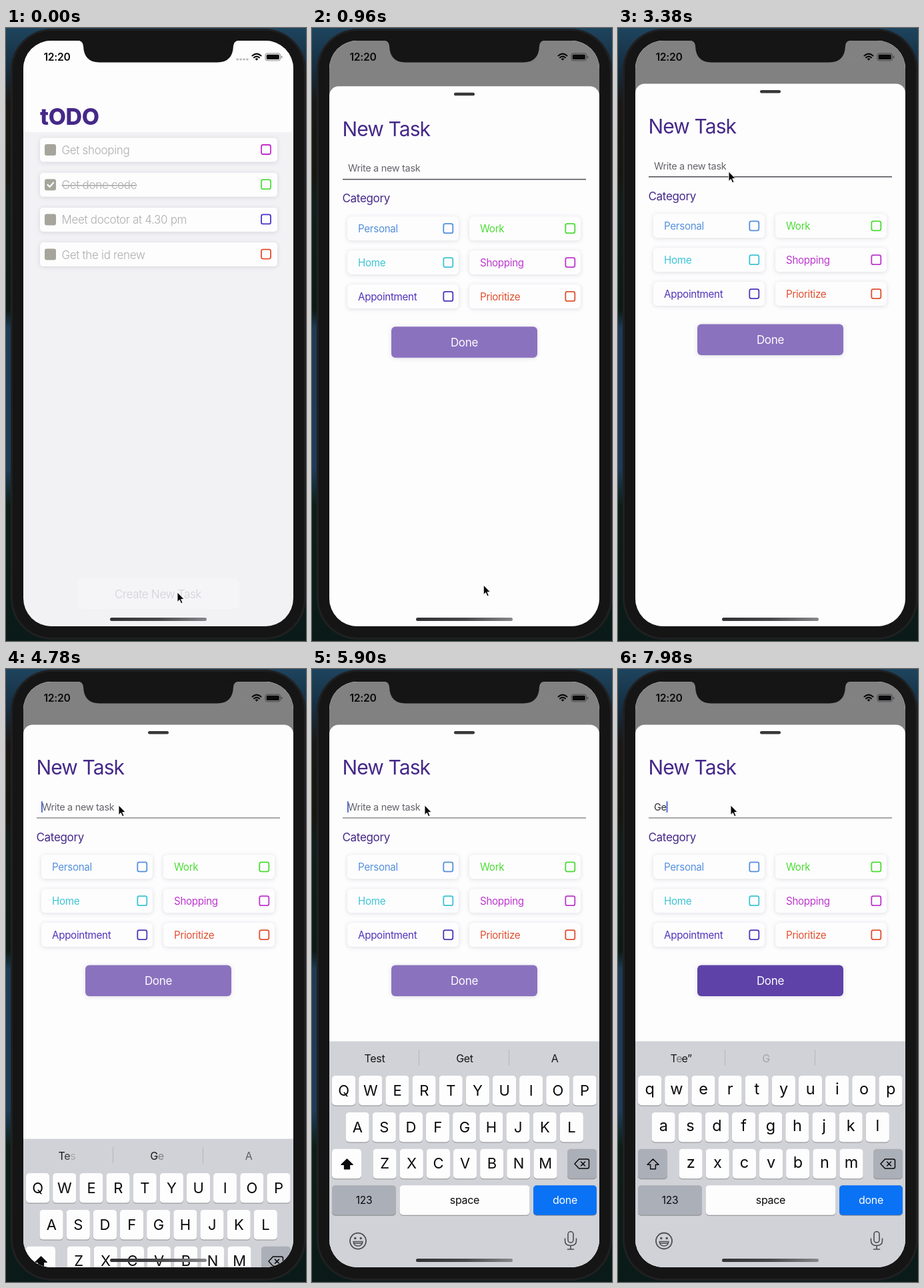
These frames come from a looping animation (450x918 px, 8000 ms). An HTML page:

```html
<!DOCTYPE html>
<html lang="en">
<head>
<meta charset="utf-8">
<title>tODO</title>
<style>
  html, body { margin: 0; width: 100%; height: 100%; overflow: hidden; background: #161616; }
  svg { display: block; width: 450px; height: 918px; font-family: Inter, Roboto, sans-serif; letter-spacing: -.02em; }
  .mid { text-anchor: middle; }
  .card { filter: drop-shadow(0 1px 3px rgba(30, 30, 60, .14)); }
  .key { filter: drop-shadow(0 1px 0 #898a8d); }
  .line { fill: none; stroke-linecap: round; stroke-linejoin: round; }
</style>
</head>
<body>
<svg id="stage" viewBox="0 0 450 918"></svg>
<script>
const LOOP = 8000;
const SHEET = { start: 100, from: 896, to: 83.5 };
const KEYBOARD = { start: 4562, travel: 338 };
const FOCUS = 4500;
const TYPED = [[7640, 'G'], [7900, 'Ge']];
const POINTER = [
  [0, 257, 845], [900, 257, 845], [1520, 268, 447], [1900, 240, 330],
  [2500, 190, 250], [3200, 166, 215], [3400, 166, 215], [3800, 169, 204], [LOOP, 169, 204]
];
const WHITE = '#fdfdfe', INK = '#0a0a0c', KEY_GRAY = '#abafb7', TITLE = '#452888';
const PLACEHOLDER = '#64646a', LINE = '#56565c', IDLE = '#8b72bf', READY = '#5e42a8';

const rect = (x, y, w, h, r, fill, more = '') =>
  `<rect x="${x}" y="${y}" width="${w}" height="${h}" rx="${r}" fill="${fill}" ${more}/>`;
const text = (x, y, size, fill, body, more = '') =>
  `<text x="${x}" y="${y}" font-size="${size}" fill="${fill}" ${more}>${body}</text>`;
const line = (d, stroke, width, more = '') =>
  `<path class="line" d="${d}" stroke="${stroke}" stroke-width="${width}" ${more}/>`;
const checkbox = (cx, cy, color) =>
  rect(cx - 7, cy - 7, 14, 14, 2.5, 'none', `stroke="${color}" stroke-width="1.8"`);
const gradient = (id, axis, stops) => `<linearGradient id="${id}" ${axis}>` +
  stops.map(([at, c]) => `<stop offset="${at}" stop-color="${c}"/>`).join('') + '</linearGradient>';
const mid = 'class="mid"';

// Desktop slivers around the phone and the phone body
function device() {
  const desk = [[0, '#1e445e'], [.07, '#152c3e'], [.12, '#1a1816'], [.24, '#16160f'], [.28, '#0f1e1a'],
    [.46, '#0b1a14'], [.49, '#1c3c56'], [.72, '#1c3c58'], [.78, '#0c1e16'], [1, '#0a1a18']];
  return `<defs>${gradient('desk', 'x2="0" y2="1"', desk)}
    ${gradient('homeBar', '', [[0, '#323234'], [.5, '#48484a'], [1, '#88888c']])}
    <clipPath id="screen">${rect(26, 19, 405, 877, 42, '#fff')}</clipPath></defs>
    ${rect(0, 0, 450, 918, 0, 'url(#desk)')}
    ${rect(7, 1, 443, 915, 62, '#202022')}
    ${rect(10, 4, 437, 909, 59, '#151515')}`;
}

function taskList() {
  const tasks = [['Get shooping', '#c030cc'], ['Get done code', '#50de3c'],
    ['Meet docotor at 4.30 pm', '#4834cc'], ['Get the id renew', '#e84c30']];
  const rows = tasks.map(([label, color], i) => {
    const y = 182.5 + i * 52.2, done = i === 1;
    return rect(51, y - 18, 356, 36, 5, WHITE, 'class="card"') +
      rect(58, y - 8.5, 17, 17, 3, '#a5a59c') +
      (done ? line(`M62.5 ${y}l3 3.3 5.5-6.3`, WHITE, 2.2) : '') +
      text(83.5, y + 6.5, 17, '#aeaeae', label,
        `font-weight="300" ${done ? 'text-decoration="line-through"' : ''}`) +
      checkbox(390, y - .5, color);
  }).join('');
  return rect(26, 19, 405, 877, 0, '#f2f2f5') + rect(26, 19, 405, 137, 0, WHITE) +
    text(51, 145, 34, TITLE, 'tODO', 'font-weight="800" style="letter-spacing:-.01em"') + rows +
    rect(107, 824, 243, 46, 8, '#f5f5f8') +
    text(228, 853.5, 17, '#d2d2d6', 'Create New Task', mid + ' font-weight="300"');
}

function statusBar() {
  const dots = [0, 1, 2, 3].map(i => rect(345.5 + i * 4.9, 45.5, 3.4, 3, 1, '#848488', 'opacity=".55"')).join('');
  return text(56.5, 49, 15.7, INK, '12:20', 'font-weight="600"') + dots +
    line('M369.5 41.5q6.5-5.6 13 0M372 44.3q4-3.3 8 0', INK, 2.1) +
    `<path d="M373.6 46.2q2.4-1.8 4.8 0L376 48.8Z" fill="${INK}"/>` +
    rect(389, 38, 22.5, 10.8, 3, 'none', `stroke="${INK}" stroke-opacity=".5"`) +
    rect(390.7, 39.7, 19.1, 7.4, 1.6, INK) +
    rect(412.8, 41.7, 1.5, 3.6, .7, INK, 'opacity=".5"');
}

// Laid out at its resting position
function sheet() {
  const categories = [['Personal', '#5590dc'], ['Work', '#4cdc34'], ['Home', '#3cc4d4'],
    ['Shopping', '#bc38cc'], ['Appointment', '#5034b8'], ['Prioritize', '#e05030']];
  const cells = categories.map(([label, color], i) => {
    const x = 53 + (i % 2) * 183, y = 296.3 + (i >> 1) * 50.9;
    return rect(x, y - 18, 167, 36, 6, WHITE, 'class="card"') +
      text(x + 16, y + 5.6, 15.2, color, label) + checkbox(x + 151.3, y, color);
  }).join('');
  return rect(26, 83.5, 405, 900, 14, WHITE) + rect(213, 93, 31, 4.5, 2.2, '#38383a') +
    text(45.5, 158, 30, TITLE, 'New Task', 'style="letter-spacing:-.03em"') +
    text(54, 211.5, 14.5, PLACEHOLDER, 'Write a new task', 'id="entry"') +
    rect(46, 222, 365, 1.6, 0, LINE, 'id="underline"') +
    rect(53, 198, 1.8, 17, .8, '#4460d8', 'id="caret"') +
    text(45.5, 257.5, 17, TITLE, 'Category') + cells +
    rect(119, 443.5, 219, 46.5, 6, IDLE, 'id="done" class="card"') +
    text(228.5, 473, 17, WHITE, 'Done', mid);
}

const words = ['Test', 'Get', 'A'];
function keyboard() {
  const key = (x, y, w, fill, id = '') => rect(x, y, w, 44.5, 5, fill, `class="key" ${id}`);
  const letters = [['QWERTYUIOP', 30, 609], ['ASDFGHJKL', 50.5, 664], ['ZXCVBNM', 91.5, 718.7]]
    .map(([row, x0, y]) => [...row].map((c, i) => {
      const x = x0 + i * 40.15;
      return key(x, y, 35.2, WHITE) + text(x + 17.6, y + 29.5, 22, INK, c, 'class="mid letter"');
    }).join('')).join('');
  const suggestions = words.map((word, i) => text(94 + i * 135, 588.5, 16, '#161618',
    [...word].map(c => `<tspan class="hint${i}">${c}</tspan>`).join(''), mid)).join('');
  const face = '#4c4d52';
  return rect(26, 557.5, 405, 340, 0, '#d0d2d7') +
    rect(160, 570, 1, 24, 0, '#b5b7bc') + rect(295, 570, 1, 24, 0, '#b5b7bc') +
    suggestions + text(95.5, 588.5, 16, '#161618', 'e”', 'id="nextHint"') + letters +
    key(30, 718.7, 44, WHITE, 'id="shift"') +
    line('M52.5 734l8.5 8.2h-4.6v6.6h-7.8v-6.6H44Z', INK, 1.5, 'id="arrow"') +
    key(383, 718.7, 44, KEY_GRAY) +
    line('M400.5 734h12.5q2.5 0 2.5 2.5v9q0 2.5-2.5 2.5h-12.5l-6.5-7ZM403.5 738l6 6M409.5 738l-6 6', INK, 1.5) +
    key(30, 773.2, 96, KEY_GRAY) + text(78, 801, 15.5, INK, '123', mid) +
    key(131.5, 773.2, 195, WHITE) + text(229, 800.5, 16, INK, 'space', mid) +
    key(332, 773.2, 95, '#0a72f4') + text(379.5, 800.5, 16, WHITE, 'done', mid) +
    `<circle cx="69" cy="856.5" r="12" fill="none" stroke="${face}" stroke-width="1.8"/>
     <circle cx="64.8" cy="852.5" r="1.7" fill="${face}"/><circle cx="73.2" cy="852.5" r="1.7" fill="${face}"/>` +
    line('M62 857.5h14q-1 6.5-7 6.5t-7-6.5ZM63 860h12', face, 1.5) +
    rect(384, 842.5, 8, 16.5, 4, 'none', `stroke="${face}" stroke-width="1.6"`) +
    line('M379.5 853v3q0 7.5 8.5 7.5t8.5-7.5v-3M388 863.5v5.5M383.5 869h9', face, 1.6);
}

const stage = document.getElementById('stage');
stage.innerHTML = device() +
  `<g clip-path="url(#screen)">${taskList()}
    ${rect(26, 19, 405, 877, 0, '#000', 'id="dim"')}
    ${statusBar()}<g id="sheet">${sheet()}</g><g id="keyboard">${keyboard()}</g></g>
  <path d="M107 18.5q8.5 .5 9 8.5q1 24.500 24 24.500H317q23 0 24-24.500q.5-8 9-8.500Z" fill="#151515"/>
  ${rect(156, 883, 145, 5, 2.5, 'url(#homeBar)')}
  <path id="pointer" d="M0 0V14.5L3.3 11.4 5.7 16.8 8 15.8 5.7 10.5H10.2Z" fill="#060608" stroke="#fff" stroke-width=".9"/>`;

const $ = id => document.getElementById(id);
const letters = [...document.querySelectorAll('.letter')];
const hints = words.map((_, i) => [...document.querySelectorAll('.hint' + i)]);
const clamp = v => Math.max(0, Math.min(1, v));
const set = (id, attrs) => { for (const name in attrs) $(id).setAttribute(name, attrs[name]); };
const shift = (id, x, y) => set(id, { transform: `translate(${x} ${y})` });

// Critically damped spring, 0 to 1
function spring(ms) {
  const x = Math.max(0, ms) * .0087;
  return 1 - (1 + x) * Math.exp(-x);
}

function pointerAt(t) {
  const i = POINTER.findIndex(([at]) => at > t);
  const [t0, x0, y0] = POINTER[i - 1], [t1, x1, y1] = POINTER[i];
  const u = (t - t0) / (t1 - t0), k = u * u * (3 - 2 * u);
  return [x0 + (x1 - x0) * k, y0 + (y1 - y0) * k];
}

function caretOpacity(t, typing) {
  if (t < FOCUS) return 0;
  if (typing) return 1;
  const phase = (t - FOCUS) % 1000;
  return phase < 850 ? 1 - clamp((phase - 500) / 180) : (phase - 850) / 150;
}

// Letters appear left to right and leave right to left
function hintOpacity(t, word, i) {
  const show = clamp((t - 4640 - word * 40 - i * 60) / 100);
  const hide = clamp((t - 7800 + word * 30 - (words[word].length - 1 - i) * 60) / 120);
  return show * (1 - hide);
}

function draw(t) {
  const rise = spring(t - SHEET.start);
  shift('sheet', 0, (SHEET.from - SHEET.to) * (1 - rise));
  set('dim', { opacity: .49 * rise });
  shift('keyboard', 0, KEYBOARD.travel * (1 - spring(t - KEYBOARD.start)));
  shift('pointer', ...pointerAt(t));

  const typed = TYPED.reduce((now, [at, value]) => t >= at ? value : now, '');
  const typing = typed !== '', focused = t >= FOCUS;
  $('entry').textContent = typed || 'Write a new task';
  set('entry', { fill: typing ? '#2a2a2e' : PLACEHOLDER });
  set('underline', { height: focused ? 1 : 1.6, y: focused ? 222.5 : 222 });
  set('caret', {
    x: typing ? 54 + $('entry').getComputedTextLength() : 53,
    opacity: caretOpacity(t, typing)
  });
  set('done', { fill: typing ? READY : IDLE });

  for (const el of letters) {
    const c = el.textContent;
    el.textContent = typing ? c.toLowerCase() : c.toUpperCase();
    el.setAttribute('font-size', typing ? 23.5 : 22);
    el.setAttribute('dy', typing ? -1.5 : 0);
  }
  set('shift', { fill: typing ? KEY_GRAY : WHITE });
  $('arrow').style.fill = typing ? 'none' : INK;
  hints.forEach((spans, word) => spans.forEach((el, i) =>
    el.setAttribute('fill-opacity', hintOpacity(t, word, i))));
  set('nextHint', { opacity: clamp((t - 7900) / 80) });
}

const began = performance.now();
function tick() {
  draw((performance.now() - began) % LOOP);
  requestAnimationFrame(tick);
}
tick();
</script>
</body>
</html>
```
